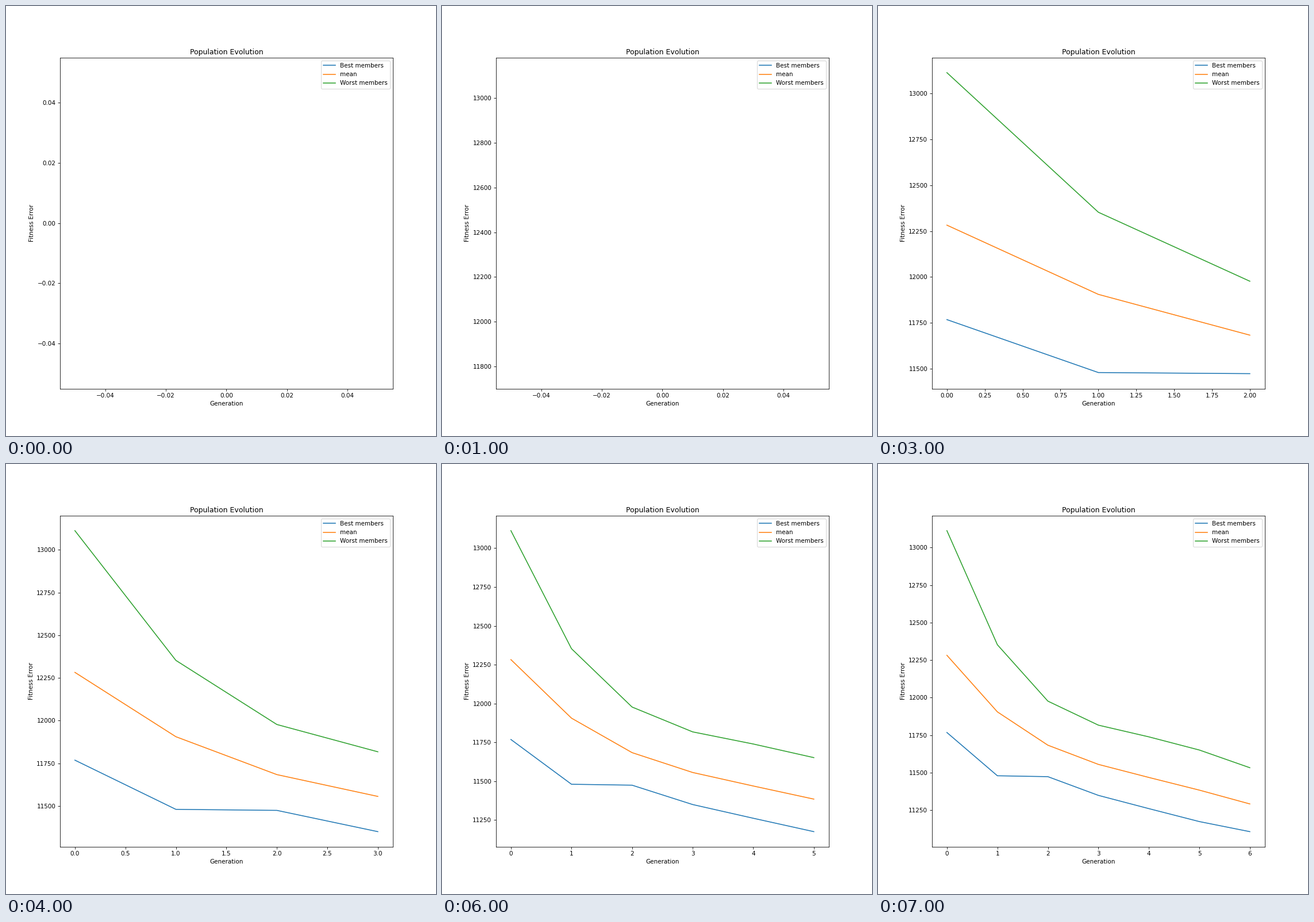
Recreate the animation shown at these times as a matplotlib script. Size 748 px wide and 748 px high, loop 8 s.

```python
import matplotlib.pyplot as plt
import numpy as np
from matplotlib.animation import FuncAnimation

SIZE, INCHES = 748, 10
STEPS, STEP_MS = 8, 1000


def error_curve(gens, level, slope, drop, rate, wave):
    """Fitness error: steady decline, a geometric early drop and a slow ripple."""
    return level - slope * gens + drop * rate**gens - wave * np.sin(np.pi * gens / 3)


# A negative rate makes the early drop overshoot and settle
CURVES = {
    "Best members": dict(level=11605, slope=83, drop=163, rate=-0.35, wave=-17),
    "mean": dict(level=11615.5, slope=57, drop=667, rate=0.55, wave=23),
    "Worst members": dict(level=11802, slope=48, drop=1311, rate=0.495, wave=58),
}

fig, ax = plt.subplots(figsize=(INCHES, INCHES), dpi=SIZE / INCHES)


def draw(count):
    """Plot the first `count` generations; the axes rescale to fit."""
    ax.clear()
    gens = np.arange(count)
    for label, params in CURVES.items():
        ax.plot(gens, error_curve(gens, **params), label=label)
    ax.set_title("Population Evolution")
    ax.set_xlabel("Generation")
    ax.set_ylabel("Fitness Error")
    ax.legend(loc="upper right")


anim = FuncAnimation(fig, draw, frames=STEPS, init_func=lambda: draw(0),
                     interval=STEP_MS, repeat=True)
plt.show()
```
